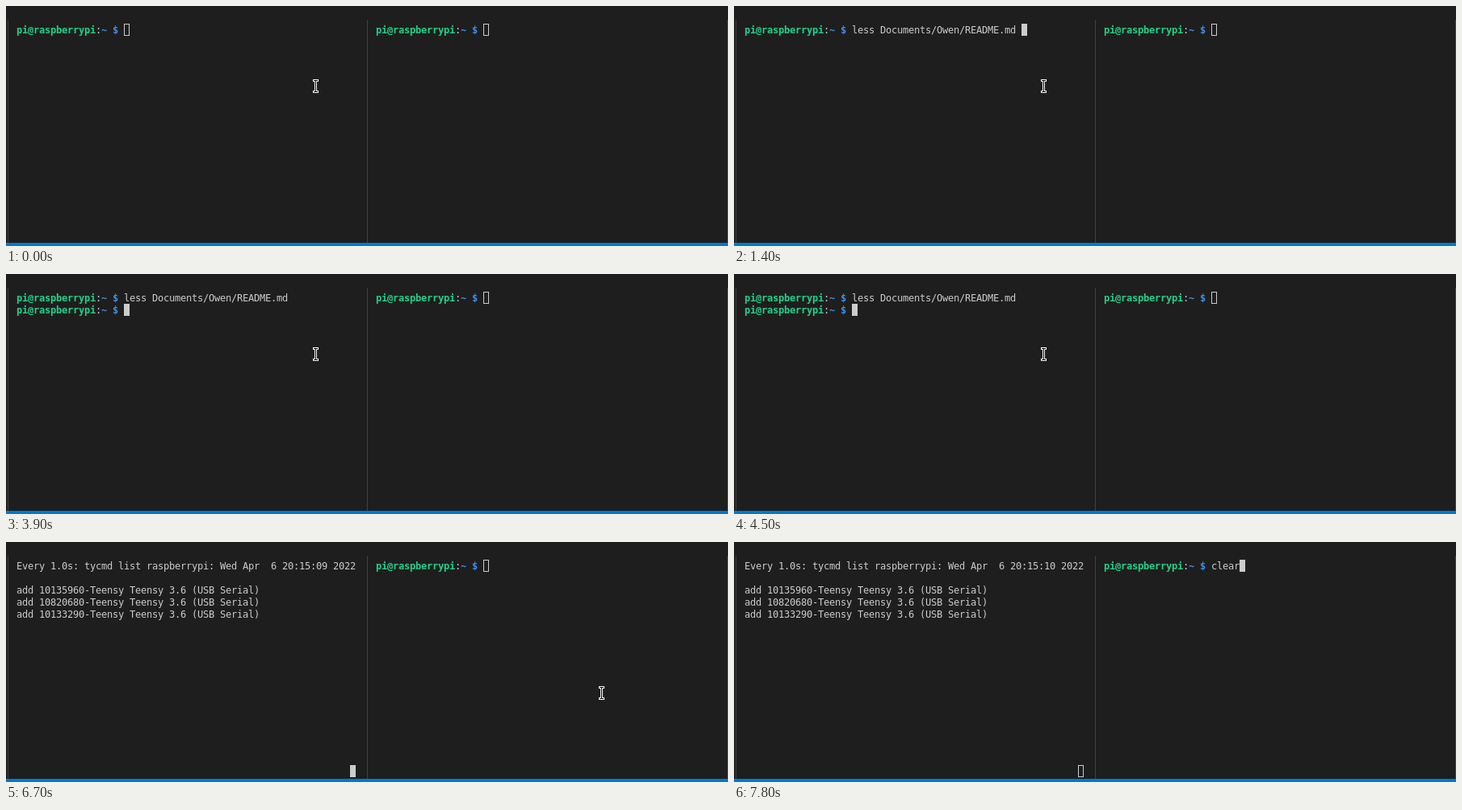
An HTML page with a canvas for the animation above (8 s loop, 894 px wide and 298 px high).

```html
<!DOCTYPE html>
<html lang="en">
<head>
<meta charset="utf-8">
<title>Two terminals</title>
<style>
  html, body { margin: 0; width: 100%; height: 100%; overflow: hidden; background: #1e1e1e; }
  canvas { display: block; }
</style>
</head>
<body>
<canvas id="stage" width="894" height="298"></canvas>
<script>
const LOOP = 8000;
const CELL_W = 7, CELL_H = 15, TOP = 22, BASELINE = 12;
const LEFT = 13, RIGHT = 458;
const FONT = '12px "DejaVu Sans Mono", monospace';
const BG = '#1e1e1e', FG = '#cccccc', GREEN = '#23d18b', BLUE = '#3b8eea';
const LINE = '#414141', BAR = '#007acc';

const ctx = document.getElementById('stage').getContext('2d');

const FILE = 'Documents/Owen/README.md';
const LESS = `less ${FILE} `;
const WATCH = 'watch -n 1 tycmd list';
const BOARDS = ['10135960', '10820680', '10133290'];
const ROLES = ['gps board', 'temp sens', 'rebooter'];
const PROMPT_LEN = 'pi@raspberrypi:~ $ '.length;

function box(color, x, y, w, h) {
  ctx.fillStyle = color;
  ctx.fillRect(x, y, w, h);
}

// Terminal text sits on a whole-pixel grid, one glyph per cell.
function text(pane, col, row, str, color = FG, bold = false) {
  ctx.font = (bold ? 'bold ' : '') + FONT;
  ctx.fillStyle = color;
  [...str].forEach((ch, i) => {
    if (ch !== ' ') ctx.fillText(ch, pane + (col + i) * CELL_W, TOP + row * CELL_H + BASELINE);
  });
}

function cursor(pane, col, row, solid) {
  const x = pane + col * CELL_W, y = TOP + row * CELL_H;
  box(FG, x, y, CELL_W, CELL_H);
  if (!solid) box(BG, x + 1, y + 1, CELL_W - 2, CELL_H - 2);
}

function prompt(pane, row, command = '') {
  text(pane, 0, row, 'pi@raspberrypi', GREEN, true);
  text(pane, 14, row, ':');
  text(pane, 15, row, '~ $', BLUE, true);
  text(pane, PROMPT_LEN, row, command);
}

function typing(pane, row, command, solid) {
  prompt(pane, row, command);
  cursor(pane, PROMPT_LEN + command.length, row, solid);
}

function pager() {
  BOARDS.forEach((id, i) => text(LEFT, 0, i + 1, `${id}-Teensy: ${ROLES[i]}`));
  const status = `${FILE} (END)`;
  box(FG, LEFT, TOP + 4 * CELL_H, status.length * CELL_W, CELL_H);
  text(LEFT, 0, 4, status, BG);
  cursor(LEFT, status.length, 4, true);
}

function history(command) {
  prompt(LEFT, 0, LESS);
  typing(LEFT, 1, command, true);
}

function started() {
  prompt(LEFT, 0, LESS);
  prompt(LEFT, 1, WATCH);
  cursor(LEFT, 0, 2, true);
}

function watching(second, solid) {
  text(LEFT, 0, 0, `Every 1.0s: tycmd list raspberrypi: Wed Apr  6 20:15:${second} 2022`);
  BOARDS.forEach((id, i) => text(LEFT, 0, i + 2, `add ${id}-Teensy Teensy 3.6 (USB Serial)`));
  cursor(LEFT, 59, 17, solid);
}

const leftSteps = [
  [0, () => typing(LEFT, 0, '', false)],
  [200, () => typing(LEFT, 0, '', true)],
  [800, () => typing(LEFT, 0, WATCH, true)],
  [1400, () => typing(LEFT, 0, LESS, true)],
  [1900, pager],
  [3900, () => history('')],
  [4200, () => history(LESS)],
  [4500, () => history('')],
  [5000, () => history(WATCH)],
  [5600, started],
  [5700, () => watching('09', true)],
  [6900, () => watching('10', false)]
];

const rightSteps = [
  [0, () => typing(RIGHT, 0, '', false)],
  [6900, () => typing(RIGHT, 0, '', true)],
  [7800, () => typing(RIGHT, 0, 'clear', true)]
];

const pointerSteps = [
  [0, () => pointer(380, 91)],
  [6600, () => pointer(524, 127)],
  [6700, () => pointer(734, 179)],
  [6800, () => pointer(864, 184)],
  [7700, () => {}]
];

function pointer(x, y) {
  box('#ffffff', x, y, 7, 3);
  box('#ffffff', x, y + 14, 7, 3);
  box('#ffffff', x + 2, y, 3, 17);
  box('#000000', x + 1, y + 1, 5, 1);
  box('#000000', x + 1, y + 15, 5, 1);
  box('#000000', x + 3, y + 1, 1, 15);
}

function play(steps, t) {
  let action = steps[0][1];
  for (const [at, fn] of steps) if (t >= at) action = fn;
  action();
}

function draw(t) {
  box(BG, 0, 0, 894, 298);
  for (const x of [2, 447, 893]) box(LINE, x, 17, 1, 277);
  box(BAR, 0, 294, 894, 4);
  play(leftSteps, t);
  play(rightSteps, t);
  play(pointerSteps, t);
}

const start = performance.now();
function tick() {
  draw((performance.now() - start) % LOOP);
  requestAnimationFrame(tick);
}
tick();
</script>
</body>
</html>
```
